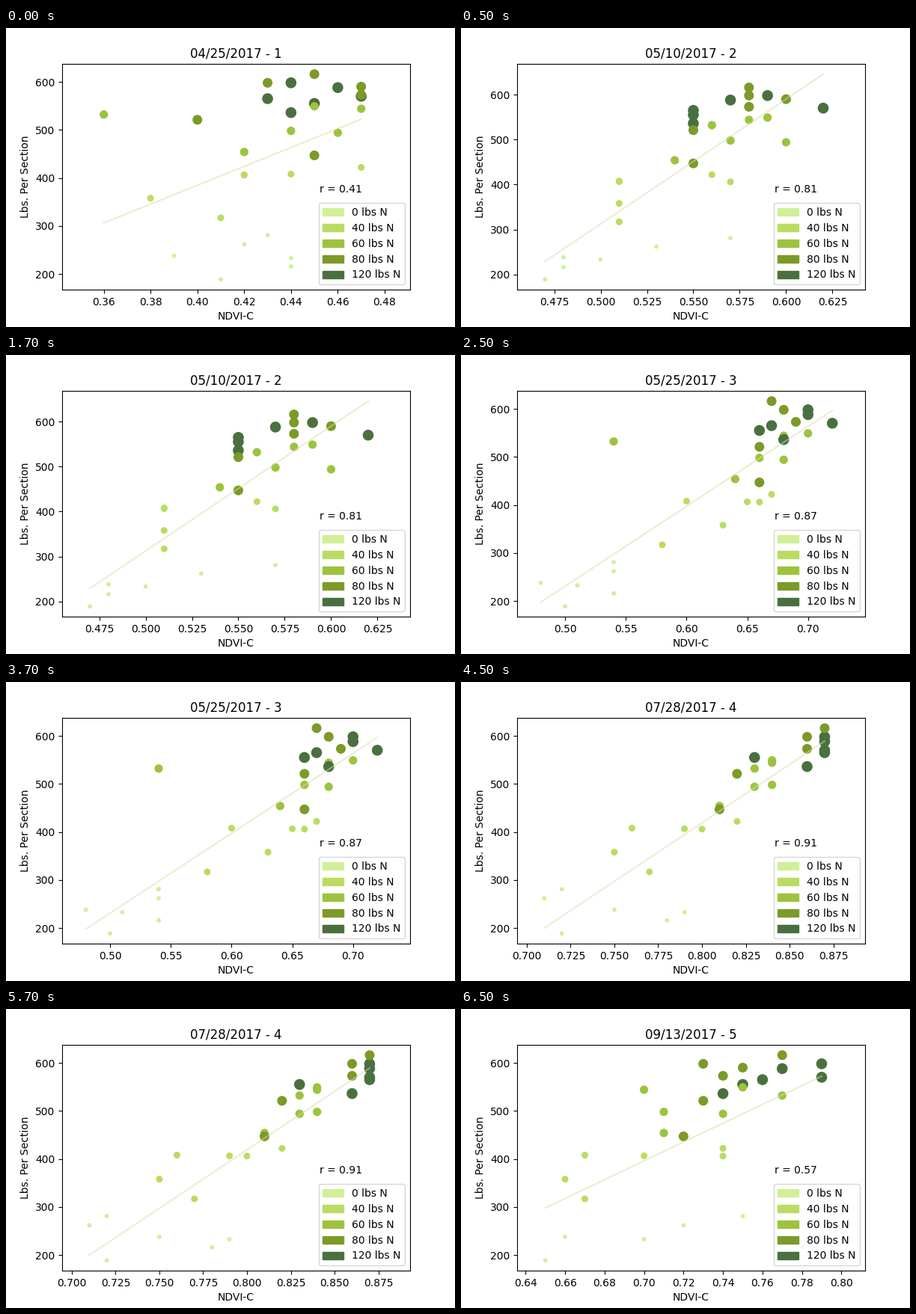
A matplotlib script that plays this animation: 600 by 400 pixels, repeating every 8000 ms.

```python
from collections import namedtuple

import matplotlib.pyplot as plt
import numpy as np
from matplotlib.animation import FuncAnimation
from matplotlib.patches import Patch
from matplotlib.ticker import MultipleLocator

RATES = [0, 40, 60, 80, 120]
COLORS = np.array(["#d0f097", "#badc62", "#9dc33e", "#7c9a27", "#4a703f"])
SIZES = np.array([10, 30, 50, 70, 90])

# Plots in drawing order: rate index and yield of each.
RATE = np.repeat([0, 1, 2, 3, 4, 2, 3], [6, 6, 5, 3, 6, 1, 3])
YIELD = np.array([
    238, 189, 262, 281, 233, 216,
    358, 317, 408, 406.5, 406, 422,
    532, 454, 498, 494, 544,
    447, 590, 598,
    598, 588, 570, 565, 555, 536,
    549, 616, 521, 573])

# ndvi is given in hundredths, one value per plot.
Survey = namedtuple("Survey", "title r xlim step ndvi")

april = Survey("04/25/2017 - 1", 0.41, (0.3422, 0.4909), 0.02, [
    39, 41, 42, 43, 44, 44, 38, 41, 44, 42, 42, 47, 36, 42, 44, 46, 47,
    45, 47, 43, 44, 46, 47, 43, 45, 44, 45, 45, 40, 47])
early_may = Survey("05/10/2017 - 2", 0.81, (0.4550, 0.6426), 0.025, [
    48, 47, 53, 57, 50, 48, 51, 51, 51, 51, 57, 56, 56, 54, 57, 60, 58,
    55, 60, 58, 59, 57, 62, 55, 55, 55, 59, 58, 55, 58])
late_may = Survey("05/25/2017 - 3", 0.87, (0.4605, 0.7470), 0.05, [
    48, 50, 54, 54, 51, 54, 63, 58, 60, 65, 66, 67, 54, 64, 66, 68, 68,
    66, 70, 68, 70, 70, 72, 67, 66, 68, 70, 67, 66, 69])
july = Survey("07/28/2017 - 4", 0.91, (0.6945, 0.8931), 0.025, [
    75, 72, 71, 72, 79, 78, 75, 77, 76, 79, 80, 82, 83, 81, 84, 83, 84,
    81, 87, 86, 87, 87, 87, 87, 83, 86, 84, 87, 82, 86])
september = Survey("09/13/2017 - 5", 0.57, (0.6357, 0.8120), 0.02, [
    66, 65, 72, 75, 70, 78, 66, 67, 67, 70, 74, 74, 77, 71, 71, 74, 70,
    72, 75, 73, 79, 77, 79, 76, 75, 74, 75, 77, 73, 74])
SURVEYS = [april, early_may, late_may, july, september]

fig, ax = plt.subplots(figsize=(6, 4), dpi=100)
fig.subplots_adjust(left=0.125, right=0.9, bottom=0.125, top=0.88)
handles = [Patch(color=c, label=f"{n} lbs N") for n, c in zip(RATES, COLORS)]


def draw(i):
    # Half-second ticks: the first survey shows for one, the others for four.
    survey = SURVEYS[(i + 3) // 4]
    x = np.array(survey.ndvi) / 100
    ends = np.array([x.min(), x.max()])
    trend = np.polyval(np.polyfit(x, YIELD, 1), ends)
    low = min(YIELD.min(), trend.min())
    high = max(YIELD.max(), trend.max())
    pad = 0.05 * (high - low)

    ax.clear()
    ax.scatter(x, YIELD, s=SIZES[RATE], c=COLORS[RATE])
    ax.plot(ends, trend, color="#d7dda5", alpha=0.5, lw=1.5)
    ax.set(title=survey.title, xlabel="NDVI-C", ylabel="Lbs. Per Section",
           xlim=survey.xlim, ylim=(low - pad, high + pad))
    ax.xaxis.set_major_locator(MultipleLocator(survey.step))
    ax.yaxis.set_major_locator(MultipleLocator(100))
    ax.text(0.74, 0.43, f"r = {survey.r:.2f}", transform=ax.transAxes)
    ax.legend(handles=handles, loc="lower right")


anim = FuncAnimation(fig, draw, frames=16, interval=500, repeat=True,
                     repeat_delay=0, init_func=lambda: None)
plt.show()
```
